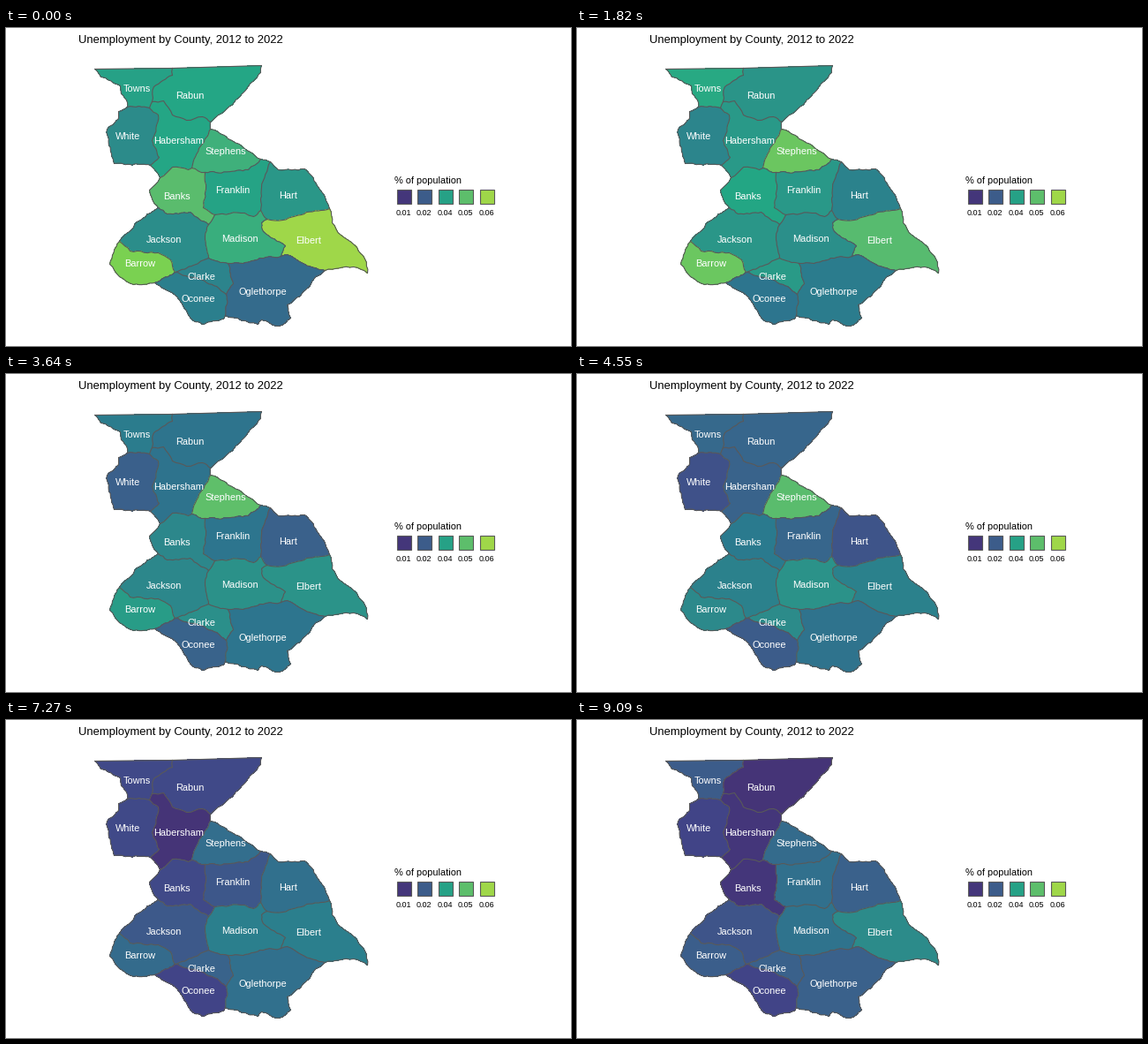
These frames come from a looping animation (640x360 px, 10000 ms). A matplotlib script:

```python
import random

import matplotlib.pyplot as plt
import numpy as np
from matplotlib.animation import FuncAnimation
from matplotlib.patches import Polygon, Rectangle

W, H, DPI = 640, 360, 100
PX = 72 / DPI
STEP, LOOP, YEARS = 50, 10000, 11
EDGE = dict(color="#595959", lw=1.1 * PX)
STOPS = "440154", "414487", "2a788e", "22a884", "7ad151", "fde725"
# How far each year has moved along a county's key values
PACE = 0, 1, 1.3, 1.55, 1.8, 2, 2.6, 3, 3, 4, 4

plt.rcParams["font.family"] = "Liberation Sans"
rng = random.Random(4)

# Colour scale, blended in CIE Lab
XYZ = np.array([[0.4124, 0.3576, 0.1805], [0.2126, 0.7152, 0.0722], [0.0193, 0.1192, 0.9505]])
WHITE = XYZ.sum(axis=1)
LAB = np.array([[0, 116, 0], [500, -500, 0], [0, 200, -200]])


def to_lab(code):
    rgb = np.array([int(code[i:i + 2], 16) for i in (0, 2, 4)]) / 255
    lin = np.where(rgb > 0.04045, ((rgb + 0.055) / 1.055) ** 2.4, rgb / 12.92)
    q = XYZ @ lin / WHITE
    return LAB @ np.where(q > 0.008856, np.cbrt(q), 7.787 * q + 16 / 116)


def to_rgb(lab):
    q = np.linalg.solve(LAB, lab)
    lin = np.linalg.solve(XYZ, WHITE * np.where(q > 0.2069, q ** 3, (q - 16 / 116) / 7.787))
    lin = np.clip(lin, 0, 1)
    return np.where(lin > 0.0031308, 1.055 * lin ** (1 / 2.4) - 0.055, 12.92 * lin)


SCALE = np.array([to_lab(c) for c in STOPS])


def shade(percent):
    return to_rgb([np.interp(percent / 20, range(6), channel) for channel in SCALE.T])


# Places where borders meet
NODES = dict(
    a=(188, 45), b=(165, 83), c=(162, 90), d=(137, 89), e=(231, 106), f=(163, 155),
    g=(174, 169), h=(210, 158), i=(225, 163), j=(231, 114), k=(288, 148), l=(299, 151),
    m=(366, 204), n=(288, 206), o=(295, 216), p=(311, 258), q=(361, 274), r=(248, 325),
    s=(249, 301), t=(251, 266), u=(229, 260), v=(191, 276), w=(168, 288), x=(128, 241),
    y=(172, 203), z=(229, 222), A=(236, 211))
borders = []


def wobble(p, q):
    """Points after p up to q, bent at random; long surveyed lines stay straight."""
    (x0, y0), (x1, y1) = p, q
    d = np.hypot(x1 - x0, y1 - y0)
    if d < 5 or d > 60:
        return [q]
    k = rng.uniform(-1, 1) * min(1, 0.12 * d) / d
    mid = (x0 + x1) / 2 - (y1 - y0) * k, (y0 + y1) / 2 + (x1 - x0) * k
    return wobble(p, mid) + wobble(mid, q)


def border(owners, ends, *xy):
    keys = [NODES[ends[0]], *zip(xy[::2], xy[1::2]), NODES[ends[1]]]
    pts = keys[:1]
    for p, q in zip(keys, keys[1:]):
        pts += wobble(p, q)
    borders.append((owners.split(), pts))


def outline(name):
    todo = [pts for owners, pts in borders if name in owners]
    out = list(todo.pop(0))
    while todo:
        pts = next(b for b in todo if out[-1] in (b[0], b[-1]))
        todo.remove(pts)
        out += pts if pts[0] == out[-1] else pts[::-1]
    return out


border("Towns", "ad", 100, 46, 107, 55, 129, 65, 130, 74, 137, 84)
border("Towns Rabun", "ab", 188, 53, 167, 66)
border("Towns Habersham", "bc")
border("Towns White", "cd", 150, 88)
border("Rabun", "ae", 289, 42, 288, 50, 271, 70, 253, 88, 240, 98)
border("Rabun Habersham", "be", 178, 82, 188, 98, 204, 104, 222, 100)
border("Habersham", "ej")
border("White", "df", 127, 94, 127, 102, 114, 114, 119, 142, 122, 153)
border("White Habersham", "cf", 172, 98, 165, 127, 173, 146)
border("Habersham", "fg")
border("Habersham Banks", "gh", 188, 157, 206, 160)
border("Habersham Stephens", "jh", 220, 133)
border("Stephens", "jk", 247, 121, 264, 131)
border("Stephens Banks", "hi")
border("Stephens Franklin", "ik", 274, 160)
border("Franklin", "kl")
border("Franklin Hart", "ln", 289, 180)
border("Franklin Banks", "iA", 226, 182, 223, 203)
border("Franklin Madison", "An", 270, 209, 280, 213)
border("Hart", "lm", 308, 160, 338, 159, 346, 167, 358, 186)
border("Hart Madison", "no")
border("Hart Elbert", "om", 313, 217, 340, 208)
border("Elbert", "mq", 369, 220, 379, 234, 394, 245, 406, 261, 409, 277, 393, 270)
border("Elbert Madison", "op", 289, 220, 291, 230, 316, 246)
border("Elbert Oglethorpe", "pq", 318, 256, 334, 265)
border("Banks", "gy", 162, 183, 165, 193)
border("Banks Jackson", "yz", 182, 210, 208, 208)
border("Banks Madison", "zA")
border("Jackson", "yx", 148, 219)
border("Jackson Madison", "zu", 225, 236)
border("Jackson Clarke", "uv", 212, 268)
border("Jackson Barrow", "xv", 140, 252, 172, 254, 186, 262)
border("Barrow", "xw", 117, 267, 128, 281, 144, 290)
border("Barrow Oconee", "wv")
border("Madison Clarke", "ut")
border("Madison Oglethorpe", "tp", 268, 266, 294, 259)
border("Clarke Oconee", "vs", 216, 283, 238, 292)
border("Clarke Oglethorpe", "ts", 257, 289)
border("Oconee Oglethorpe", "sr", 250, 312)
border("Oconee", "wr", 190, 301, 212, 331, 222, 335, 246, 329)
border("Oglethorpe", "qr", 348, 284, 333, 303, 318, 313, 322, 328, 309, 337, 289, 330, 285, 335)

fig = plt.figure(figsize=(W / DPI, H / DPI), dpi=DPI, facecolor="white")
ax = fig.add_axes([0, 0, 1, 1])
ax.set(xlim=(-0.5, W - 0.5), ylim=(H - 0.5, -0.5))
ax.axis("off")
counties = []


def text(x, y, s, size, **kw):
    ax.text(x, y, s, fontsize=size * PX, **kw)


def county(name, x, y, *keys):
    """Add a county with its label and its shades at the key years."""
    face = ax.add_patch(Polygon(outline(name), ec="none", aa=False))
    text(x, y + 2.5, name, 11, color="white", ha="center", zorder=4)
    counties.append((face, [shade(np.interp(p, range(5), keys)) for p in PACE]))


# Key values: 2012, 2013, 2017, 2020, 2022
county("Towns", 148, 69, 57, 72, 34, 22, 29)
county("Rabun", 208, 77, 59, 60, 33, 22, 14)
county("White", 138, 123, 48, 54, 25, 22, 20)
county("Habersham", 195, 128, 59, 63, 32, 14, 15)
county("Stephens", 248, 140, 64, 77, 70, 36, 35)
county("Franklin", 256, 184, 58, 62, 33, 27, 37)
county("Hart", 319, 190, 53, 52, 26, 37, 31)
county("Banks", 193, 191, 70, 67, 41, 22, 15)
county("Elbert", 342, 241, 85, 80, 44, 43, 48)
county("Jackson", 179, 240, 49, 56, 44, 28, 26)
county("Madison", 264, 239, 63, 49, 51, 43, 38)
county("Barrow", 151, 267, 80, 87, 47, 35, 30)
county("Clarke", 221, 282, 45, 57, 48, 32, 31)
county("Oconee", 217, 307, 43, 43, 29, 20, 20)
county("Oglethorpe", 290, 299, 35, 43, 38, 37, 31)

for _, pts in borders:
    ax.plot(*zip(*pts), zorder=3, **EDGE)

text(82, 17, "Unemployment by County, 2012 to 2022", 13)
text(440, 176, "% of population", 11)
for n, v in enumerate((1, 2, 4, 5, 6)):
    x = 442 + 23.5 * n
    ax.add_patch(Rectangle((x, 182), 16, 16, fc=shade(1 + 14 * v),
                           ec=EDGE["color"], lw=EDGE["lw"]))
    text(x + 7.5, 212, f"0.0{v}", 9, ha="center")


def update(i):
    year = (i * STEP + STEP - 5) * YEARS // LOOP
    for face, shades in counties:
        face.set_facecolor(shades[year])
    return [face for face, _ in counties]


anim = FuncAnimation(fig, update, frames=LOOP // STEP, interval=STEP,
                     repeat=True, repeat_delay=0, blit=False)
plt.show()
```
